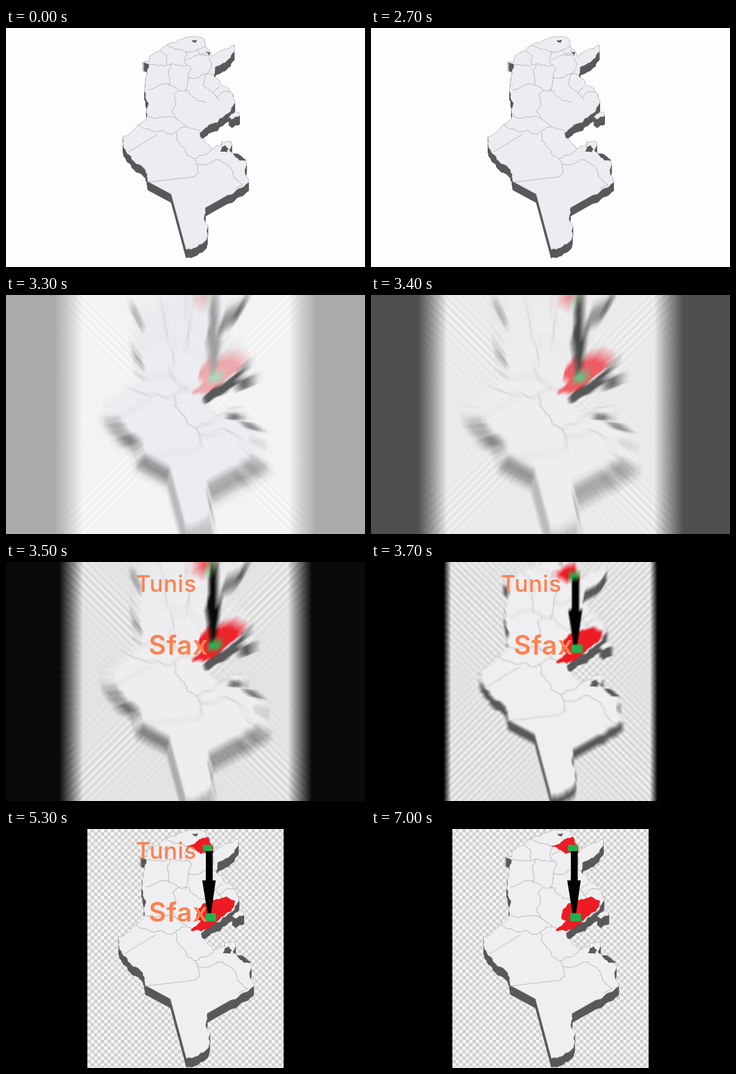
An HTML page with a canvas for the animation above (7.1 s loop, 600 by 400 pixels).

```html
<!DOCTYPE html>
<html lang="en">
<head>
<meta charset="utf-8">
<title>Route map</title>
<style>
  html, body { margin: 0; width: 100%; height: 100%; overflow: hidden; background: #fdfcfe; }
  canvas { display: block; width: 600px; height: 400px; }
</style>
</head>
<body>
<canvas id="stage" width="600" height="400"></canvas>
<script>
const W = 600, H = 400, LOOP = 7100, STEP = 100;
const DEPTH = 14.5, ROUTE_ZOOM = 1.073;
const SIDE = '#58595b';

// Key points only; roughen() adds the ragged detail between them.
const north = '227,58 239,57 241,46 258,37 269,28 290,19 306,14 331,18 333,30 341,39 345,48 363,36 381,28 382,39 366,58 349,66 348,82 362,97 372,101 383,122 377,133 364,148 337,165 324,175 326,184';
const south = '344,202 361,196 361,190 375,189 378,196 373,205 386,216 402,224 400,246 406,258 397,266 370,280 333,301 331,317 338,332 336,350 318,367 301,371 276,278 237,257 232,236 206,212 195,194 195,181 222,161 236,147 238,125 234,119 232,92 239,61 234,59';
const island = '372,149 389,141 391,147 377,153';
const lagoons = ['310,21 319,20 317,25', '358,207 361,199 367,196 372,202 369,208', '379,210 402,222 391,222', '331,38 341,40 340,46'];
const borders = [
  '204,208 253,178',
  '222,161 243,172 278,178 302,165 287,154 262,149 237,148',
  '284,174 285,188 303,213 315,219 344,202',
  '315,219 322,243 315,249 237,258',
  '319,228 350,220 377,236 380,247 396,262 383,269',
  '302,165 325,173',
  '237,103 262,94 288,104 280,112 284,130 277,139 287,154',
  '288,104 305,105 320,121 335,125',
  '299,108 304,82 334,77 330,95 346,109 356,121',
  '240,61 277,60 271,70 272,97',
  '277,60 303,62 309,70 304,82',
  '258,37 269,46 268,61',
  '269,28 281,35 302,40 318,37 334,30',
  '302,40 298,50 303,62',
  '301,54 318,46 340,46',
  '340,50 343,68 334,77 348,80',
  '318,37 324,44 338,43',
  '346,109 357,98',
  '350,117 360,108 376,107'
];
// Highlighted regions, in stage coordinates.
const regions = [
  '301,28 318,21 328,15 338,13 346,28 347,40 326,42 313,34',
  '309,168 326,154 318,150 329,125 346,119 368,113 383,121 376,138 346,160 327,171 310,171'
];

let seed = 7;
const rand = () => (seed = (seed * 16807) % 2147483647) / 2147483647 - 0.5;

// Midpoint displacement between two points.
function roughen(path, x0, y0, x1, y1) {
  const dx = x1 - x0, dy = y1 - y0;
  if (Math.hypot(dx, dy) < 4) return path.lineTo(x1, y1);
  const k = rand() * 0.28;
  const mx = (x0 + x1) / 2 - dy * k, my = (y0 + y1) / 2 + dx * k;
  roughen(path, x0, y0, mx, my);
  roughen(path, mx, my, x1, y1);
}

// Long segments are surveyed frontiers and stay straight.
function trace(text, closed) {
  const pts = text.split(' ').map(p => p.split(',').map(Number));
  const path = new Path2D();
  if (closed) pts.push(pts[0]);
  path.moveTo(...pts[0]);
  for (let i = 1; i < pts.length; i++) {
    const [x0, y0] = pts[i - 1], [x1, y1] = pts[i];
    if (Math.hypot(x1 - x0, y1 - y0) > 42.5) path.lineTo(x1, y1);
    else roughen(path, x0, y0, x1, y1);
  }
  if (closed) path.closePath();
  return path;
}

const land = trace(north + ' ' + south, true);
land.addPath(trace(island, true));
const lagoonPaths = lagoons.map(p => trace(p, true));
const borderPaths = borders.map(p => trace(p, false));
const regionPaths = regions.map(p => trace(p, true));

function layer() {
  const c = document.createElement('canvas');
  c.width = W;
  c.height = H;
  const g = c.getContext('2d');
  g.imageSmoothingQuality = 'high';
  return g;
}

function drawMap(g, face, line, lineWidth) {
  g.lineJoin = 'round';
  g.fillStyle = SIDE;
  for (let d = DEPTH; d >= 0; d -= 0.5) {
    g.save();
    g.translate(0, d);
    g.fill(land);
    g.restore();
  }
  g.fillStyle = face;
  g.fill(land);
  g.strokeStyle = line;
  g.lineWidth = lineWidth;
  borderPaths.forEach(p => g.stroke(p));
  g.lineWidth = 0.5;
  g.stroke(land);
  g.fillStyle = SIDE;
  lagoonPaths.forEach(p => g.fill(p));
}

function plainScene() {
  const g = layer();
  g.fillStyle = '#fdfcfe';
  g.fillRect(0, 0, W, H);
  drawMap(g, '#ecedf0', '#a3a4a7', 0.8);
  return g.canvas;
}

function routeScene() {
  const g = layer(), left = 136, right = 464, cell = 5.6;
  g.fillStyle = '#000';
  g.fillRect(0, 0, W, H);
  g.save();
  g.beginPath();
  g.rect(left, 0, right - left, H);
  g.clip();
  g.fillStyle = '#f5f5f5';
  g.fillRect(left, 0, right - left, H);
  g.fillStyle = '#cfcfcf';
  for (let r = 0; r * cell < H; r++) {
    for (let c = (r + 1) % 2; left + c * cell < right; c += 2) {
      g.fillRect(left + c * cell, r * cell, cell, cell);
    }
  }
  g.translate(W / 2 + 0.5, H / 2 + 0.5);
  g.scale(ROUTE_ZOOM, ROUTE_ZOOM);
  g.translate(-W / 2, -H / 2);
  drawMap(g, '#efeef0', '#b9b9bb', 1);
  g.restore();

  g.fillStyle = '#ed1c24';
  regionPaths.forEach(p => g.fill(p));
  g.fillStyle = '#000';
  g.fillRect(334, 36, 11.5, 52);
  g.fill(new Path2D('M328 86H350.5L342.500 143H337Z'));
  g.fillStyle = '#22b14c';
  g.fillRect(329, 26.5, 16, 10.5);
  g.fillRect(333, 141, 18, 13.5);
  return g.canvas;
}

const plain = plainScene(), route = routeScene();
const stage = document.getElementById('stage').getContext('2d');
let front = layer(), back = layer();

function drawScaled(g, image, s, alpha) {
  g.globalAlpha = alpha;
  g.drawImage(image, W / 2 * (1 - s), H / 2 * (1 - s), W * s, H * s);
  g.globalAlpha = 1;
}

// Each pass doubles the number of averaged zoom copies.
function zoomBlur(amount) {
  const near = 1 + amount * 0.17, far = 1 + amount;
  const passes = 5, ratio = Math.pow(far / near, 1 / (2 ** passes - 1));
  drawScaled(back, front.canvas, near, 1);
  [front, back] = [back, front];
  for (let i = 0; i < passes; i++) {
    drawScaled(back, front.canvas, 1, 1);
    drawScaled(back, front.canvas, ratio ** (2 ** i), 0.5);
    [front, back] = [back, front];
  }
}

function label(text, weight, size, x, y) {
  stage.font = `${weight} ${size}px Inter, "Open Sans", sans-serif`;
  stage.fillText(text, x, y);
}

function drawLabels() {
  stage.fillStyle = '#fc8150';
  stage.letterSpacing = '0.8px';
  label('Tunis', 500, 38, 217, 50);
  label('Sfax', 600, 44.5, 238.5, 154.5);
}

function render(t) {
  const u = Math.min(1, Math.max(0, (t - 3150) / 400));
  const mix = u * u * (3 - 2 * u);
  const blur = 0.35 * Math.exp(-(((t - 3370) / 280) ** 2));
  drawScaled(front, plain, 1, 1);
  if (mix) drawScaled(front, route, 1, mix);
  if (blur > 0.002) zoomBlur(blur);
  stage.drawImage(front.canvas, 0, 0);
  if (t >= 3500 && t < 7000) drawLabels();
}

const start = performance.now();
let shown = -1;
function tick() {
  const t = Math.floor((performance.now() - start) % LOOP / STEP) * STEP;
  if (t !== shown) render(shown = t);
  requestAnimationFrame(tick);
}
tick();
</script>
</body>
</html>
```
